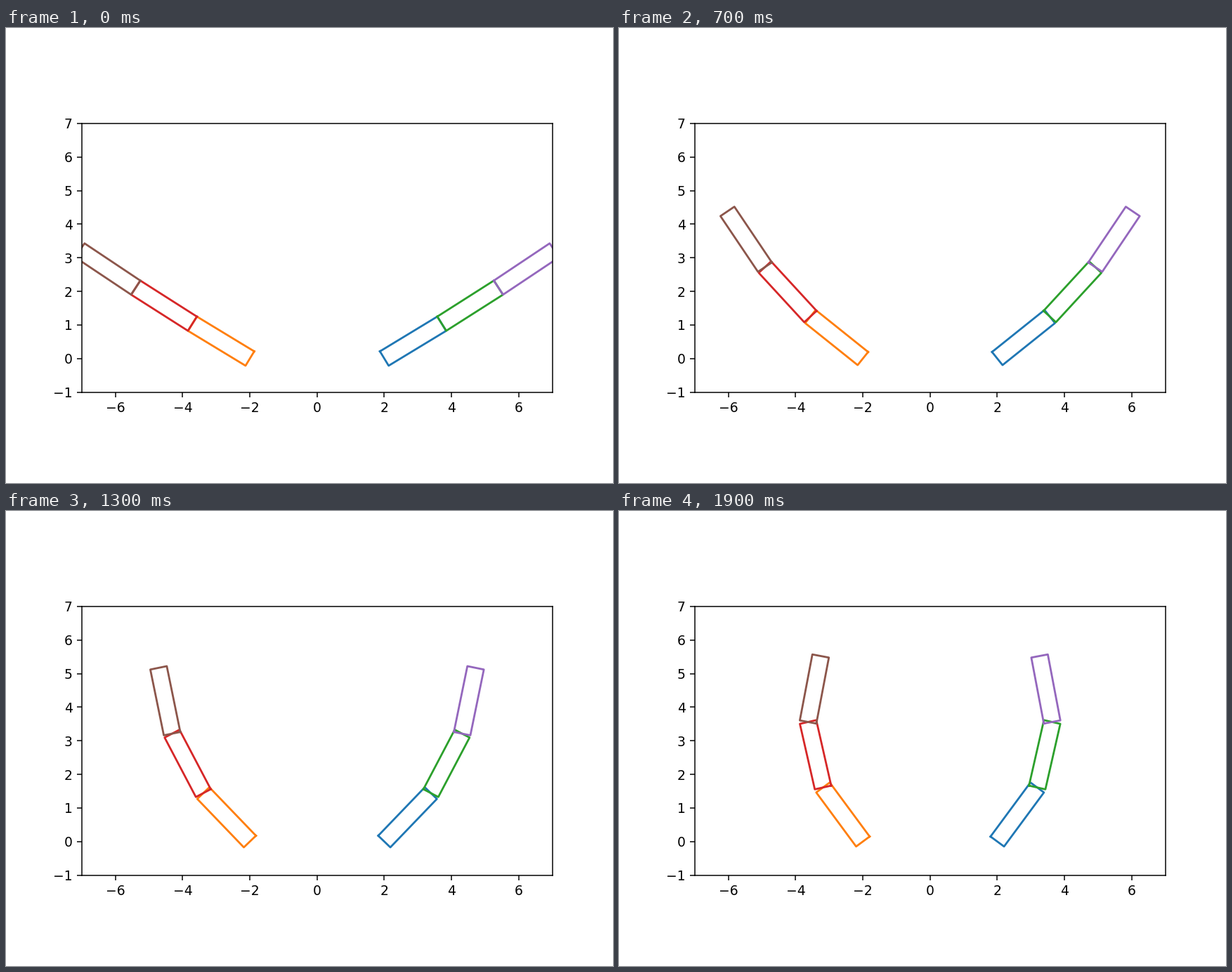
These frames come from a looping animation (864x648 px, 2000 ms). A matplotlib script:

```python
import numpy as np
import matplotlib.pyplot as plt
from matplotlib.animation import FuncAnimation

FRAMES = 20
INTERVAL = 100
LENGTH, WIDTH = 2.0, 0.5
BASE_X = 2.0
START = np.pi / 6
STEP = np.pi / 5 / 29      # bend added at each joint per step
COLORS = [("C0", "C1"), ("C2", "C3"), ("C4", "C5")]   # right, left

fig, ax = plt.subplots(figsize=(6.4, 4.8), dpi=135)
ax.set_aspect("equal")
ax.set_xlim(-7, 7)
ax.set_ylim(-1, 7)
ax.set_xticks(range(-6, 7, 2))
ax.set_yticks(range(-1, 8))

links = [[ax.plot([], [], color=c, lw=1.5)[0] for c in pair] for pair in COLORS]


def box(joint, angle):
    """Closed outline of a link that starts at joint and points along angle."""
    along = LENGTH * np.array([np.cos(angle), np.sin(angle)])
    side = WIDTH / 2 * np.array([-np.sin(angle), np.cos(angle)])
    corners = [joint + side, joint - side,
               joint - side + along, joint + side + along, joint + side]
    return np.array(corners).T, joint + along


def update(i):
    step = max(i, 1 + i / 2)     # slow start, then one step per frame
    joint = np.array([BASE_X, 0.0])
    for n, (right, left) in enumerate(links, start=1):
        (x, y), joint = box(joint, START + n * step * STEP)
        right.set_data(x, y)
        left.set_data(-x, y)
    return [line for pair in links for line in pair]


anim = FuncAnimation(fig, update, frames=FRAMES, interval=INTERVAL,
                     repeat=True, repeat_delay=0)
plt.show()
```
